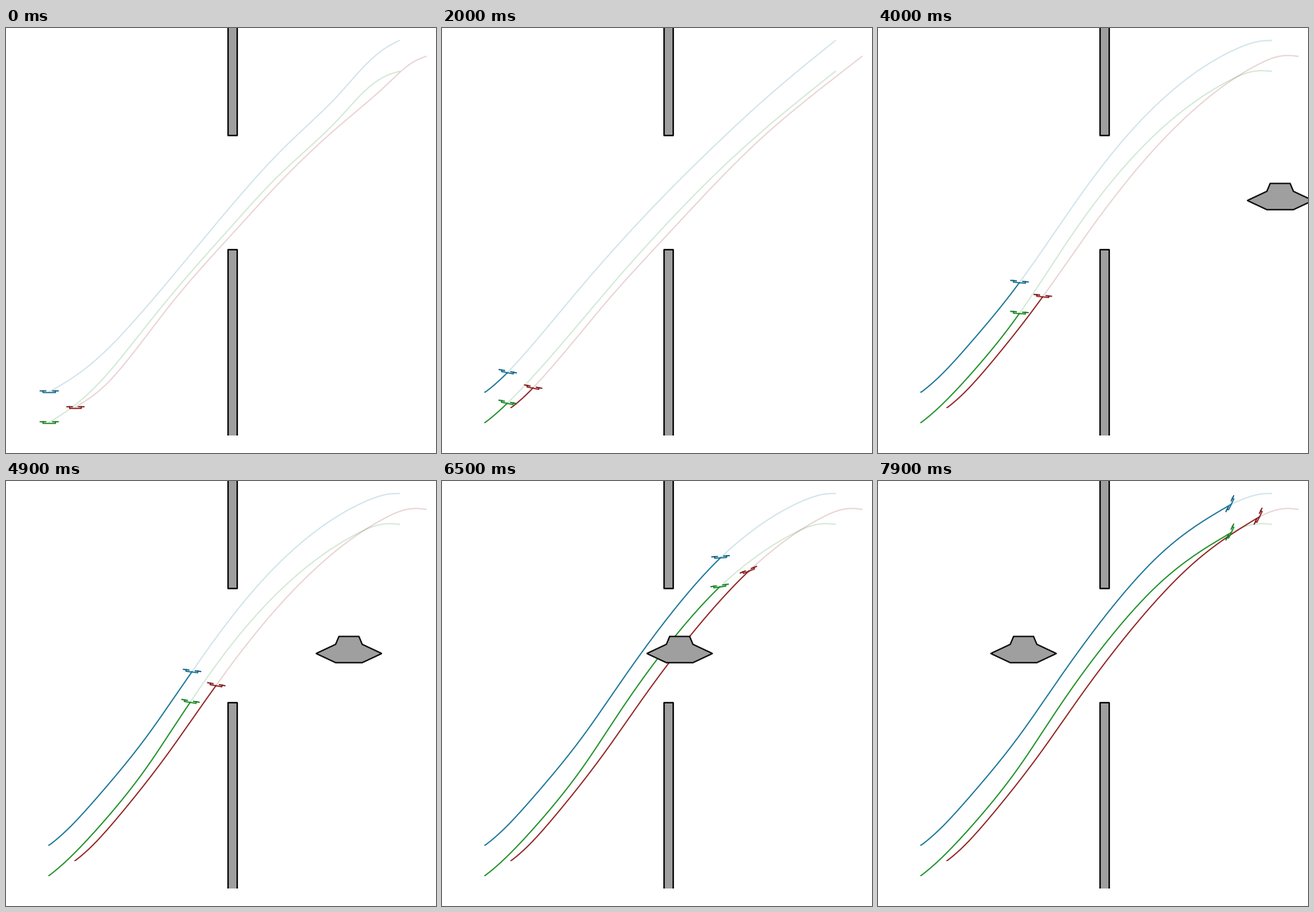
A matplotlib script for the animation above (8000 ms loop, 517 by 510 pixels).

```python
import matplotlib.pyplot as plt
import numpy as np
from matplotlib.animation import FuncAnimation
from matplotlib.patches import Polygon

W, H, DPI = 517, 510, 64
FRAMES, STEP = 80, 100
PX = 72 / DPI
GREY = "#9f9f9f"

KEY_T = np.array([0, 0.9, 2, 3, 4, 4.9, 6.5, 7.9])
TILT_T = [0, 0.3, 1, 2, 3, 4, 4.9, 5.7, 6.5, 7.2, 7.9]
# start time of each plan, and how many motion keys it follows
PLANS = [(0, 1), (0.5, 3), (2.8, 4), (3.3, 8)]


def spline(t, p, at):
    """Natural cubic spline through points p at parameters t."""
    t, p, at = np.asarray(t, float), np.asarray(p, float), np.asarray(at, float)
    n, h = len(t), np.diff(t)
    a, b = np.eye(n), np.zeros_like(p)
    slope = np.diff(p, axis=0) / h[:, None]
    for i in range(1, n - 1):
        a[i, i - 1:i + 2] = h[i - 1], 2 * (h[i - 1] + h[i]), h[i]
        b[i] = 6 * (slope[i] - slope[i - 1])
    m = np.linalg.solve(a, b)
    k = np.clip(np.searchsorted(t, at, side="right") - 1, 0, n - 2)
    u, hk = (at - t[k])[:, None], h[k][:, None]
    return (p[k] + u * (slope[k] - hk * (2 * m[k] + m[k + 1]) / 6)
            + u ** 2 * m[k] / 2 + u ** 3 * (m[k + 1] - m[k]) / (6 * hk))


def curve(points):
    p = np.array(points, float)
    s = np.r_[0, np.cumsum(np.hypot(*np.diff(p, axis=0).T))]
    return spline(s, p, np.linspace(0, s[-1], 500))


class Drone:
    BODY = np.array([(-7.2, -1.7), (-7.2, 0.2), (7.2, 0.2), (7.2, -1.7)])
    ROTORS = [np.array([(x - 4, -1.7), (x + 4, -1.7)]) for x in (-7.2, 7.2)]

    def __init__(self, ax, color, dark, keys, tilt, futures):
        self.keys, self.tilt = keys, tilt
        self.plans = [curve(keys[:n] + f) for (_, n), f in zip(PLANS, futures)]

        def line(c, w, z, **kw):
            return ax.plot([], [], color=c, lw=w * PX, zorder=z, **kw)[0]

        self.plan = line(color, 1.4, 1, alpha=0.2)
        self.trail = line(color, 1.4, 2)
        self.body = line(color, 1.4, 3)
        self.rotors = [line(dark, 1.4, 4, solid_capstyle="butt") for _ in range(2)]

    def update(self, t):
        path = spline(KEY_T, self.keys, np.linspace(0, t, 2 + int(t * 30)))
        pos = path[-1]
        self.trail.set_data(*path.T)

        plan = self.plans[sum(t >= start - 1e-6 for start, _ in PLANS) - 1]
        ahead = plan[plan[:, 0] > pos[0]]
        self.plan.set_data(*np.vstack([pos, ahead]).T)

        a = np.radians(np.interp(t, TILT_T, self.tilt))
        turn = np.array([(np.cos(a), np.sin(a)), (-np.sin(a), np.cos(a))])
        self.body.set_data(*(self.BODY @ turn + pos).T)
        for artist, rotor in zip(self.rotors, self.ROTORS):
            artist.set_data(*(rotor @ turn + pos).T)


def wall(ax, top, bottom, outline):
    ax.fill([267, 278, 278, 267], [top, top, bottom, bottom], color=GREY, lw=0)
    ax.plot(*outline, color="black", lw=1.7 * PX, solid_capstyle="butt")


fig = plt.figure(figsize=(W / DPI, H / DPI), dpi=DPI, facecolor="white")
ax = fig.add_axes([0, 0, 1, 1])
wall(ax, 0, 129, ([267, 267, 278, 278], [-5, 129, 129, -5]))
wall(ax, 266, 489, ([267, 267, 278, 278], [489, 266, 266, 489]))
ax.set(xlim=(0, W), ylim=(H, 0))
ax.axis("off")

HULL = np.array([(-39.5, 207), (-16, 196), (-12, 186.5), (12, 186.5),
                 (16, 196), (39.5, 207), (16, 218), (-16, 218)])
saucer = ax.add_patch(Polygon(HULL, closed=True, fc=GREY, ec="black",
                              lw=1.6 * PX, zorder=6))

blue = Drone(
    ax, "#0e6e92", "#0b5674",
    [(51.5, 437), (55, 434.7), (78.7, 413.5), (116.7, 371.5),
     (170, 305.5), (223.5, 229), (335, 92), (424.5, 28)],
    [0, 5, 10, 11, 12, 5, 7, 5, -4, -30, -64],
    [[(75, 423), (100, 405), (150, 356), (200, 298), (272, 212),
      (340, 138), (400, 80), (463, 20), (473, 15)],
     [(150, 331), (200, 273), (272, 196), (330, 139), (400, 75), (473, 15)],
     [(200, 273), (272, 196), (330, 139), (388, 84), (473, 15)],
     [(448, 18.5), (460, 15.7), (473, 15)]])

green = Drone(
    ax, "#128a1c", "#0f7418",
    [(51.5, 473.5), (55, 471), (78.5, 450.3), (118, 408),
     (170, 342.5), (221.5, 265.5), (334, 127), (424.5, 62)],
    [0, 5, 10, 11, 12, 4, 9, 3, -8, -33, -64],
    [[(77, 457), (110, 428), (150, 381), (200, 319), (272, 237),
      (330, 175), (400, 109), (463, 55), (473, 52)],
     [(150, 372), (200, 313), (272, 233), (330, 174), (400, 111), (473, 52)],
     [(150, 375), (180, 338), (215, 283), (267, 199), (300, 160), (340, 121),
      (388, 84), (425, 60), (455, 49), (470, 47.5), (473, 52)],
     [(445, 53.5), (458, 51.3), (473, 52)]])

red = Drone(
    ax, "#8b1717", "#781010",
    [(83, 455.5), (86.5, 453), (109.3, 432), (147, 388.5),
     (198, 322.5), (252.5, 245.5), (369, 108), (458.5, 43)],
    [0, 5, 10, 11, 12, 6, 10, -4, -22, -42, -64],
    [[(110, 437), (140, 406), (200, 329), (272, 247),
      (340, 174), (400, 118), (460, 66), (495, 38), (505, 34)],
     [(200, 326), (272, 247), (340, 175), (400, 118), (460, 69), (505, 34)],
     [(200, 325), (240, 268), (272, 221), (320, 158), (388, 87),
      (430, 57), (460, 40), (490, 31), (505, 34)],
     [(478, 35), (493, 33), (505, 34)]])


def update(frame):
    t = frame * STEP / 1000
    saucer.set_xy(HULL + (483.5 - 79.1 * (t - 4), 0))
    for drone in (blue, green, red):
        drone.update(t)
    return []


anim = FuncAnimation(fig, update, frames=FRAMES, interval=STEP,
                     repeat=True, repeat_delay=0, blit=False)
# plotting must not rescale the fixed pixel stage
ax.set(xlim=(0, W), ylim=(H, 0))
plt.show()
```
